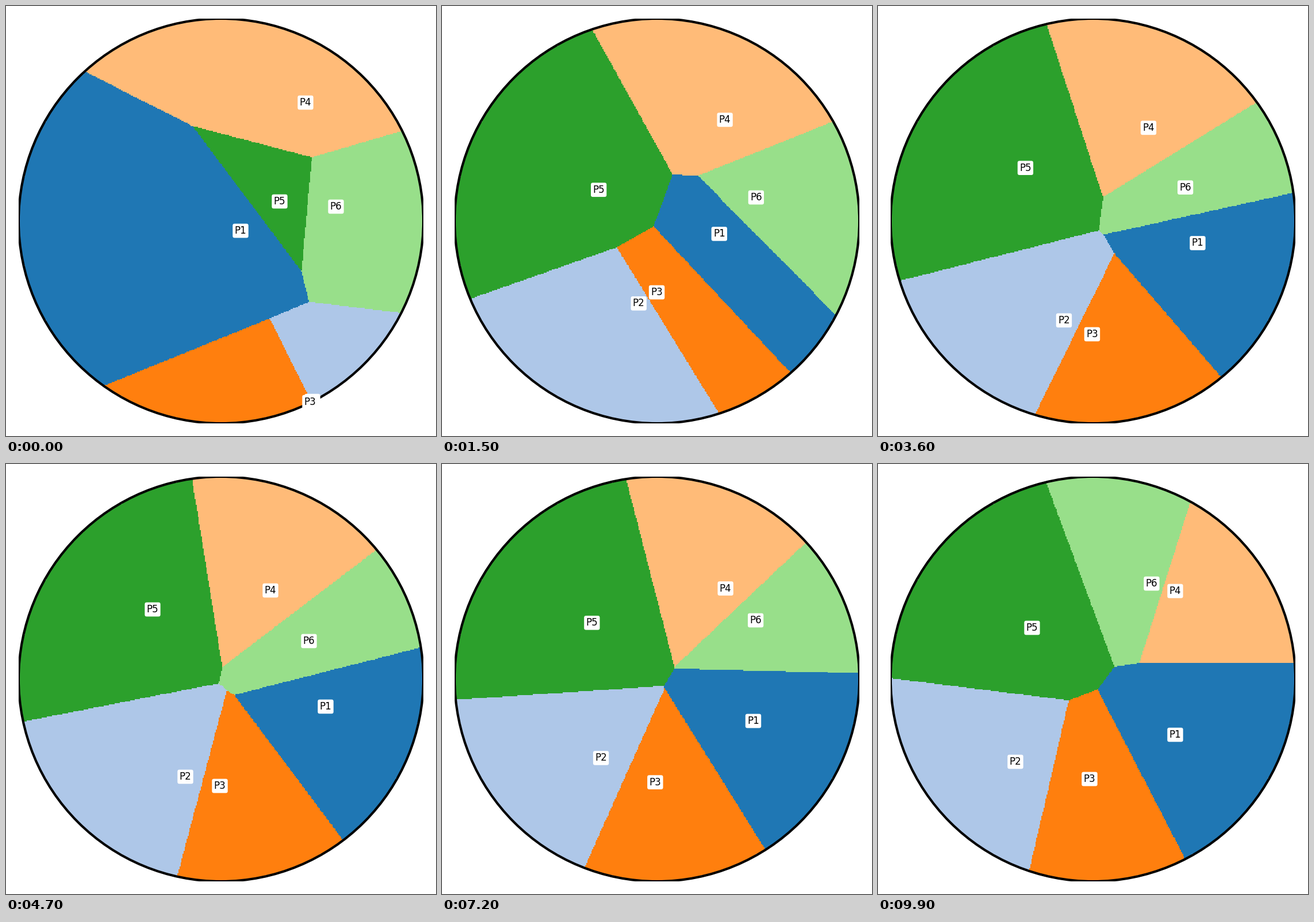
A matplotlib script that plays this animation: 748x748 px, repeating every 10000 ms.

```python
import numpy as np
import matplotlib.pyplot as plt
from matplotlib.animation import FuncAnimation

SIZE, DPI = 748, 150
FRAMES, INTERVAL = 100, 100
MARGIN = 22
LOW, HIGH = MARGIN, SIZE - MARGIN
CENTER, RADIUS = SIZE / 2, SIZE / 2 - MARGIN
CELLS = 400

# Key poses: scattered, drawn inward, spread out, settled, drifted, P4/P6 swapped.
TIMES = [0, 8, 24, 47, 90, 99]
POSES = np.array([
    [(408, 391), (533, 687), (529, 689), (521, 168), (476, 340), (574, 349)],
    [(425, 392), (347, 492), (374, 432), (500, 194), (284, 325), (549, 340)],
    [(556, 402), (336, 550), (373, 583), (482, 203), (258, 313), (543, 324)],
    [(556, 422), (312, 544), (372, 560), (460, 220), (255, 253), (527, 308)],
    [(531, 465), (251, 488), (370, 549), (517, 214), (265, 293), (559, 246)],
    [(517, 471), (239, 518), (368, 548), (517, 221), (268, 285), (476, 208)],
])
PLAYERS = POSES.shape[1]

palette = plt.get_cmap("tab20")(range(PLAYERS))
axis = np.linspace(LOW, HIGH, CELLS)
gx, gy = np.meshgrid(axis, axis)
outside = np.hypot(gx - CENTER, gy - CENTER) > RADIUS


def sites_at(frame):
    """Every player walks straight from one key pose to the next."""
    k = min(np.searchsorted(TIMES, frame, side="right"), len(TIMES) - 1)
    t = (frame - TIMES[k - 1]) / (TIMES[k] - TIMES[k - 1])
    return (1 - t) * POSES[k - 1] + t * POSES[k]


def territory(sites):
    """Colour each cell of the disc by its nearest player."""
    dist = [(gx - x) ** 2 + (gy - y) ** 2 for x, y in sites]
    rgba = palette[np.argmin(dist, axis=0)]
    rgba[outside] = 1
    return rgba


fig = plt.figure(figsize=(SIZE / DPI, SIZE / DPI), dpi=DPI, facecolor="white")
edge = MARGIN / SIZE
ax = fig.add_axes([edge, edge, 1 - 2 * edge, 1 - 2 * edge])

start = sites_at(0)
image = ax.imshow(territory(start), extent=(LOW, HIGH, HIGH, LOW),
                  interpolation="nearest")
ax.add_patch(plt.Circle((CENTER, CENTER), RADIUS, fill=False,
                        edgecolor="black", linewidth=2))
badge = dict(facecolor="white", edgecolor="none", boxstyle="round,pad=0.2")
labels = [
    ax.text(x, y, f"P{i}", fontsize=8, family="DejaVu Sans", color="black",
            ha="center", va="center", zorder=5, bbox=badge)
    for i, (x, y) in enumerate(start, 1)
]
ax.set_xlim(LOW, HIGH)
ax.set_ylim(HIGH, LOW)
ax.axis("off")


def update(frame):
    sites = sites_at(frame)
    image.set_data(territory(sites))
    for label, pos in zip(labels, sites):
        label.set_position(pos)
    return [image, *labels]


anim = FuncAnimation(fig, update, frames=FRAMES, interval=INTERVAL,
                     repeat=True, repeat_delay=0, blit=False)
plt.show()
```
